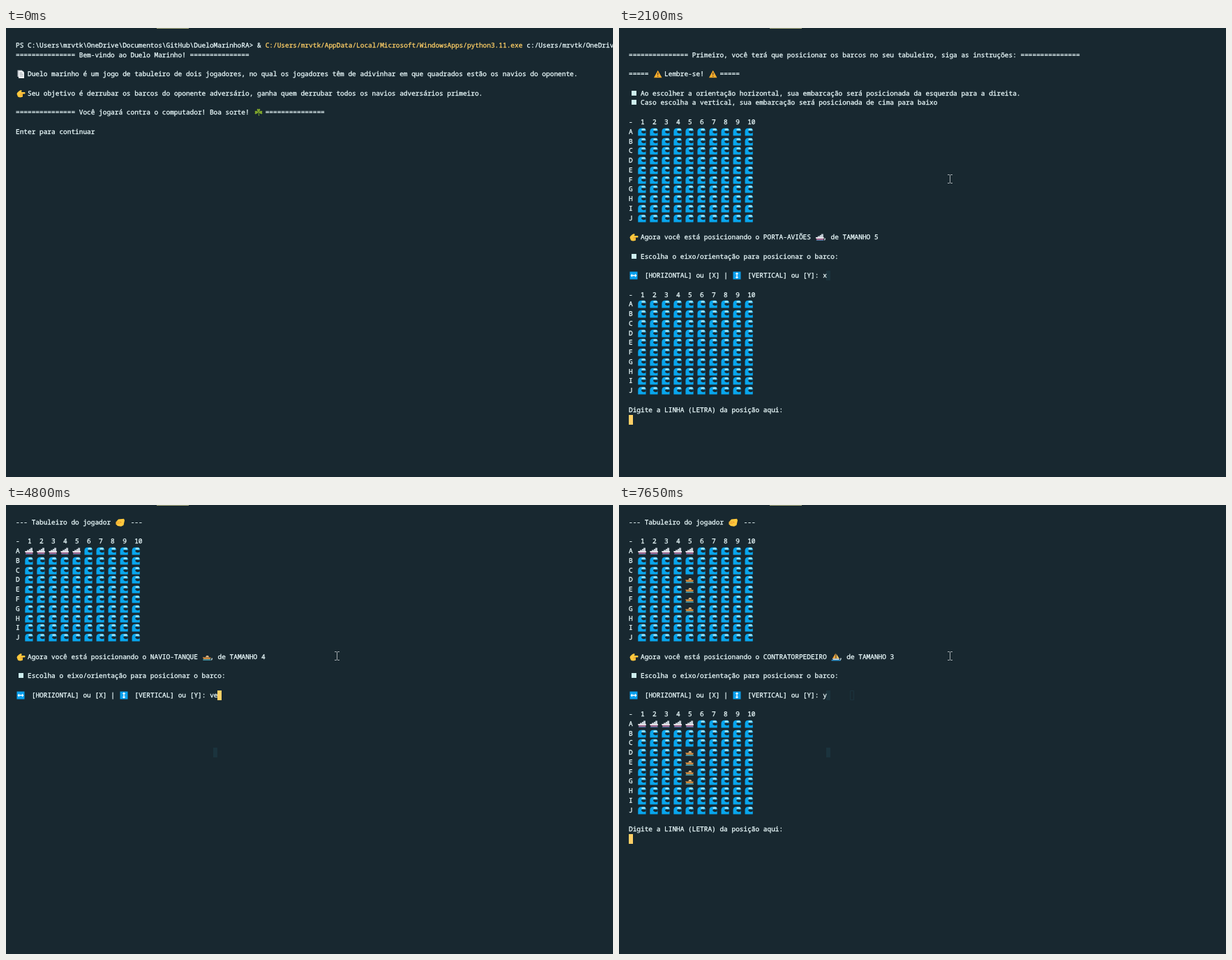
Write an HTML page with a canvas that moves like this. It is 870 px wide and 644 px high and loops after 8 s.

```html
<!DOCTYPE html>
<html lang="pt">
<head>
<meta charset="utf-8">
<style>
html, body { margin: 0; height: 100%; overflow: hidden; background: #182830; }
canvas { display: block; }
</style>
</head>
<body>
<canvas width="870" height="644"></canvas>
<script>
const ctx = document.querySelector('canvas').getContext('2d');
const BG = '#182830', TEXT = '#eafafc', YELLOW = '#ffcf66', GHOST = '#1b333d';
const LOOP = 8000, LEFT = 14, CELL = 5.677;
const RULE = '='.repeat(15);

// Each icon is a stack of [colour, path] layers about 12 px wide.
const ICONS = {
  wave: [
    ['#08a6ee', 'M.3 11.5V5Q.8 .8 5 .8H9.5L11.5 3V11.5Z'],
    [BG, 'M5 5.2Q6.5 4 8.5 4.4L11.6 4.8V7.2Q8.5 9 6.2 7.6Q5 6.8 5 5.2Z'],
    ['#a8e6f6', 'M4.5 2.2L7 1.2L10.5 1.6L11.3 3.6L9.6 3.2L9 4.8L7.6 3.6L6.2 4.4L5.8 3Z']],
  liner: [
    ['#c3ced6', 'M3 6.5V4.5H6V3H8V1.5H11V6.5Z'],
    ['#e6e2e8', 'M0 6H12L11.6 8.3H.8Z'],
    ['#a8628f', 'M.8 8.2H11.6L11 10H1.6Z'],
    ['#4d79a8', 'M1 10H11.5V11H1Z']],
  tanker: [
    ['#d9b787', 'M4 6.5L5.5 4H8L9.5 6.5Z'],
    ['#d08a3e', 'M0 6.2L12 6.8L10.5 9.5H1.5Z'],
    ['#4296a6', 'M.5 9.3H11.8V11H.5Z']],
  sail: [
    ['#f5a53a', 'M6 .5V8H1.5Z'],
    ['#ffc45c', 'M7 1.5L11 8H7Z'],
    ['#d5dde2', 'M1 8.3H12L10.5 10H2.5Z'],
    ['#2d92cf', 'M0 10H13V11.5H0Z']],
  point: [
    ['#ffc83d', 'M.5 6.5Q1.5 3 6.5 1L7.8 2L6.8 4H12Q13.3 5.2 12 6.4H9V10.5Q5 12.4 2 10.5Z'],
    ['#e8912d', 'M5.5 6.2H9.2V7.1H5.5ZM5.5 8.3H9V9.1H5.5Z']],
  fist: [
    ['#ffc83d', 'M.5 5.5L4 1.5L12 .8L13 3L11.5 10L8 11.8L3 11L.5 8.5Z'],
    ['#e8912d', 'M1 5.2H6V6H1ZM1.2 7.3H6V8.1H1.2ZM6.5 4L8.5 6L7 7.2Z']],
  page: [
    ['#b9bfc5', 'M1.5 .5H8V10H1.5Z'],
    ['#eef1f3', 'M3 1.5H9L11 3.5V12H3Z'],
    ['#8d969d', 'M4.5 4H8V4.8H4.5ZM4.5 6.2H9.5V7H4.5ZM4.5 8.4H9.5V9.2H4.5Z']],
  clover: [
    ['#7fa52b', 'M6 6Q2 1.5 5 .8L6 1.8L7 .8Q10 1.5 6 6Q1.5 10 .5 7.5L1.2 6L.5 4.5Q2.5 2.5 6 6Q9.5 2.5 11.5 4.5L10.8 6L11.5 7.5Q10 10 6 6Z'],
    ['#6f9a2c', 'M5.6 6H6.6L7.2 11H6Z']],
  warning: [
    ['#ffae2b', 'M5.7 .8L11.5 11.2H0Z'],
    ['#3a3028', 'M5.1 4H6.4L6.1 8H5.4ZM5.1 8.9H6.4V10.1H5.1Z']],
  across: [
    ['#08a0ee', 'M.5 .5H11.5V11.5H.5Z'],
    ['#fff', 'M1.5 6L4 3.6V5.3H8V3.6L10.5 6L8 8.4V6.7H4V8.4Z']],
  upDown: [
    ['#08a0ee', 'M.5 .5H11.5V11.5H.5Z'],
    ['#fff', 'M6 1.5L8.4 4H6.7V8H8.4L6 10.5L3.6 8H5.3V4H3.6Z']],
  bullet: [['#cdeeee', 'M3 2H10V9H3Z']]
};
for (const layers of Object.values(ICONS))
  for (const layer of layers) layer[1] = new Path2D(layer[1]);

// Input events are [time, field, answer]; fields are axis, line and column.
const TURNS = [
  { from: 900, row: 8, ship: 'PORTA-AVIÕES', icon: 'liner', size: 5,
    input: [[900, 0, ''], [1650, 0, 'x'], [2100, 1, ''], [3150, 1, 'a'], [3450, 2, ''], [3750, 2, '1']] },
  { from: 3900, row: 2, ship: 'NAVIO-TANQUE', icon: 'tanker', size: 4,
    input: [[3900, 0, ''], [4800, 0, 've'], [4950, 0, 'vert'], [5400, 0, 'vertica'],
      [5550, 0, 'vertical'], [5550, 1, ''], [6300, 1, 'd'], [6450, 2, '']] },
  { from: 6750, row: 2, ship: 'CONTRATORPEDEIRO', icon: 'sail', size: 3,
    input: [[6750, 0, ''], [7350, 0, 'y'], [7650, 1, '']] }
];

const colX = col => LEFT + col * CELL;
const rowY = row => Math.round(17.9 + row * 13.76);

// A hairline stroke gives the text its slightly heavy weight.
function print(row, col, text, color = TEXT) {
  const x = colX(col), y = rowY(row) + 10;
  ctx.fillStyle = ctx.strokeStyle = color;
  ctx.lineWidth = .3;
  ctx.fillText(text, x, y);
  ctx.strokeText(text, x, y);
}

function block(row, col, color = YELLOW) {
  ctx.fillStyle = color;
  ctx.fillRect(Math.floor(colX(col)), rowY(row), 6, 14);
}

function icon(name, x, row) {
  ctx.save();
  ctx.translate(x, rowY(row) + 1);
  for (const [color, path] of ICONS[name]) {
    ctx.fillStyle = color;
    ctx.fill(path);
  }
  ctx.restore();
}

function bulleted(name, row, text) {
  icon(name, 15, row);
  print(row, 3, text);
}

function intro(t) {
  print(0, 0, 'PS C:\\Users\\mrvtk\\OneDrive\\Documentos\\GitHub\\DueloMarinhoRA> &');
  print(0, 63, 'C:/Users/mrvtk/AppData/Local/Microsoft/WindowsApps/python3.11.exe', YELLOW);
  print(0, 129, 'c:/Users/mrvtk/OneDrive/Documentos');
  print(1, 0, `${RULE} Bem-vindo ao Duelo Marinho! ${RULE}`);
  bulleted('page', 3, 'Duelo marinho é um jogo de tabuleiro de dois jogadores, no qual os jogadores têm de adivinhar em que quadrados estão os navios do oponente.');
  bulleted('point', 5, 'Seu objetivo é derrubar os barcos do oponente adversário, ganha quem derrubar todos os navios adversários primeiro.');
  print(7, 0, `${RULE} Você jogará contra o computador! Boa sorte!`);
  icon('clover', 356, 7);
  print(7, 63, RULE);
  print(9, 0, 'Enter para continuar');
  if (t >= 300) block(9, 20);
}

function instructions(t) {
  print(1, 0, `${RULE} Primeiro, você terá que posicionar os barcos no seu tabuleiro, siga as instruções: ${RULE}`);
  if (t < 900) return block(3, 0);
  print(3, 0, '=====');
  icon('warning', 50, 3);
  print(3, 9, 'Lembre-se!');
  icon('warning', 129, 3);
  print(3, 23, '=====');
  bulleted('bullet', 5, 'Ao escolher a orientação horizontal, sua embarcação será posicionada da esquerda para a direita.');
  bulleted('bullet', 6, 'Caso escolha a vertical, sua embarcação será posicionada de cima para baixo');
}

function title() {
  print(0, 0, '--- Tabuleiro do jogador');
  icon('fist', 157, 0);
  print(0, 29, '---');
}

function board(top, placed) {
  print(top, 0, '-  1  2  3  4  5  6  7  8  9  10');
  for (let r = 0; r < 10; r++) {
    print(top + 1 + r, 0, 'ABCDEFGHIJ'[r]);
    for (let c = 0; c < 10; c++) {
      const liner = placed > 0 && r === 0 && c < 5;
      const tanker = placed > 1 && c === 4 && r > 2 && r < 7;
      icon(liner ? 'liner' : tanker ? 'tanker' : 'wave', 27 + c * 3 * CELL, top + 1 + r);
    }
  }
}

function turn({ row, ship, icon: shipIcon, size, input }, placed, t) {
  const answers = [];
  let field;
  for (const [time, index, text] of input) {
    if (t < time) break;
    answers[field = index] = text;
  }

  board(row, placed);
  bulleted('point', row + 12, `Agora você está posicionando o ${ship}`);
  const after = 35 + ship.length;
  icon(shipIcon, colX(after) + 1, row + 12);
  print(row + 12, after + 2, `, de TAMANHO ${size}`);
  bulleted('bullet', row + 14, 'Escolha o eixo/orientação para posicionar o barco:');
  icon('across', 15, row + 16);
  print(row + 16, 4, '[HORIZONTAL] ou [X] |');
  icon('upDown', 163, row + 16);
  print(row + 16, 30, '[VERTICAL] ou [Y]:');

  if (field > 0) {
    board(row + 18, placed);
    print(row + 30, 0, 'Digite a LINHA (LETRA) da posição aqui:');
  }
  if (field > 1) print(row + 32, 0, 'Digite a COLUNA (NUMERO) da posição aqui:');

  const slots = [[row + 16, 49], [row + 31, 0], [row + 33, 0]];
  answers.forEach((text, i) => print(...slots[i], text));
  const [cursorRow, cursorCol] = slots[field];
  block(cursorRow, cursorCol + answers[field].length);
}

// Faint marks the terminal cursor leaves behind.
function ghosts(t) {
  if (t >= 2100) block(24, 50, GHOST);
  if (t >= 5550) {
    ctx.strokeStyle = GHOST;
    ctx.lineWidth = 1;
    ctx.strokeRect(331.5, rowY(18) + .5, 5, 13);
  }
  if (t >= 7650) block(18, 50, GHOST);
}

function pointer(x, y) {
  ctx.fillStyle = '#a4acb0';
  ctx.fillRect(x, y - 5, 1, 11);
  for (const capY of [y - 6, y + 6]) {
    ctx.fillRect(x - 3, capY, 3, 1);
    ctx.fillRect(x + 1, capY, 3, 1);
  }
}

function draw(t) {
  ctx.fillStyle = BG;
  ctx.fillRect(0, 0, 870, 644);
  ctx.fillStyle = '#a5a87c';
  ctx.fillRect(216, 0, 46, 1);
  ctx.font = '9.462px "Noto Sans Mono", monospace';
  ctx.textRendering = 'geometricPrecision';
  ctx.lineJoin = 'round';

  ghosts(t);
  if (t < 750) intro(t);
  else if (t < 3900) instructions(t);
  else title();
  const current = TURNS.findLastIndex(({ from }) => t >= from);
  if (current >= 0) turn(TURNS[current], current, t);

  if (t >= 300) pointer(474, 216);
  else if (t >= 150) pointer(527, 297);
}

function tick() {
  draw(performance.now() % LOOP);
  requestAnimationFrame(tick);
}
tick();
</script>
</body>
</html>
```
